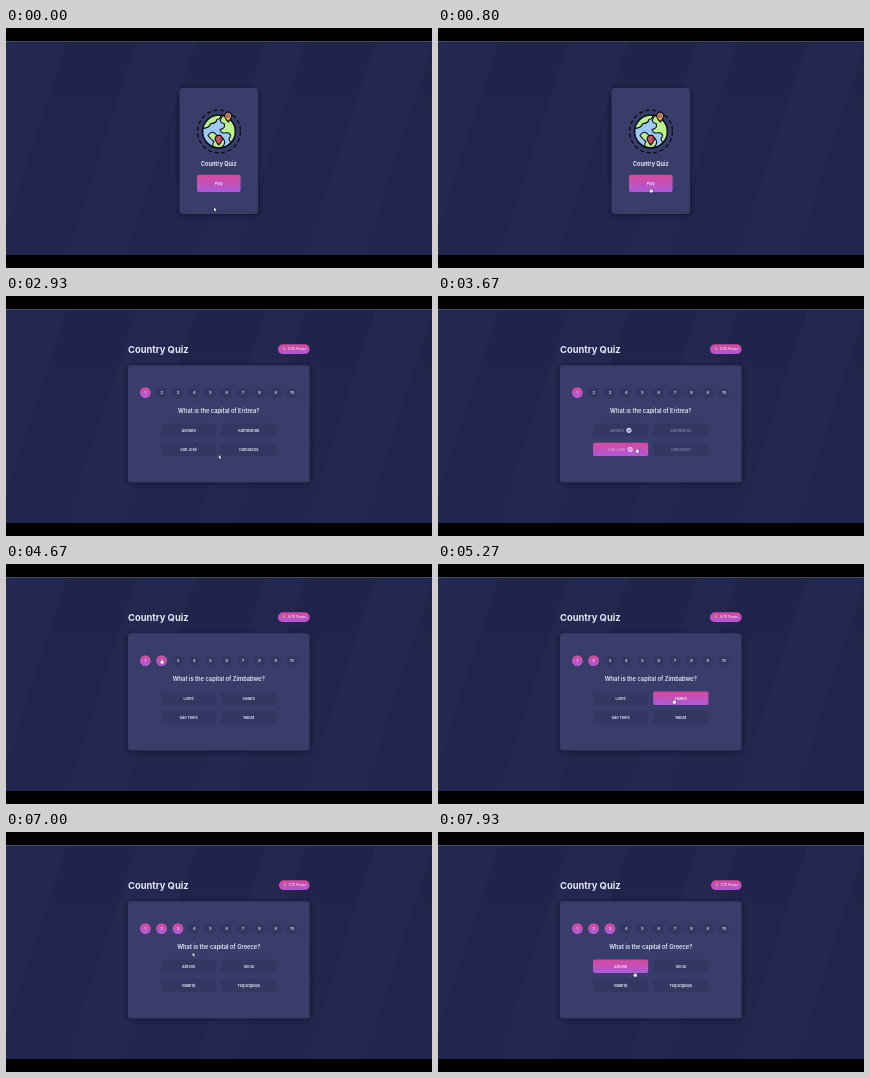
An HTML page with a canvas for the animation above (8000 ms loop, 426 px wide and 240 px high).

```html
<!DOCTYPE html>
<html lang="en">
<head>
<meta charset="utf-8">
<title>Country Quiz</title>
<style>
  html, body { margin: 0; width: 100%; height: 100%; overflow: hidden; background: #000; }
  canvas { display: block; width: 426px; height: 240px; }
</style>
</head>
<body>
<canvas id="stage"></canvas>
<script>
const W = 426, H = 240, LOOP = 8000;
const canvas = document.getElementById('stage');
const ctx = canvas.getContext('2d');
const scale = window.devicePixelRatio || 1;
canvas.width = W * scale;
canvas.height = H * scale;

const CARD = '#393d6a', TILE = '#343761', LIGHT = '#e5e7f5', DIM = '#7b7ea3', INK = '#080a14';

const START = 1930;
const questions = [
  { from: START, answered: 3470, country: 'Eritrea', options: ['Asmara', 'Kathmandu', 'San José', 'Damascus'], right: 0, picked: 2 },
  { from: 4330, answered: 5400, country: 'Zimbabwe', options: ['Lomé', 'Harare', 'São Tomé', 'Rabat'], right: 1, picked: 1 },
  { from: 6150, answered: Infinity, country: 'Greece', options: ['Athens', 'Seoul', 'Madrid', 'Tegucigalpa'], right: 0, picked: 0 }
];

// Pointer stops: time, x, y
const path = [
  [0, 208, 179.5], [70, 208, 179.5], [870, 213, 160], [1800, 213, 160],
  [2600, 212.8, 159], [2930, 212.8, 159], [3330, 199, 152.5], [3700, 199, 152.5],
  [4200, 155.8, 95.5], [4720, 155.8, 95.5], [5250, 236, 135.5], [5480, 236, 135.5],
  [5930, 174.3, 97.3], [6500, 174.3, 97.3], [7450, 197, 140.5], [8000, 197, 140.5]
];

const tiles = [0, 1, 2, 3].map(i => ({ x: 155 + (i % 2) * 60.2, y: i < 2 ? 127.6 : 146.7, w: 55.2, h: 13.4 }));
const playButton = { x: 191, y: 146.8, w: 43.6, h: 17.2 };
const inside = (p, b) => p.x >= b.x && p.x <= b.x + b.w && p.y >= b.y && p.y <= b.y + b.h;
const numberX = i => 139.3 + i * 16.3;

function pointerAt(t) {
  let i = 0;
  while (i < path.length - 2 && t >= path[i + 1][0]) i++;
  const [t0, x0, y0] = path[i], [t1, x1, y1] = path[i + 1];
  const k = Math.min(1, (t - t0) / (t1 - t0));
  const e = k * k * (3 - 2 * k);
  return { x: x0 + (x1 - x0) * e, y: y0 + (y1 - y0) * e };
}

function box(b, r, fill) {
  ctx.beginPath();
  ctx.roundRect(b.x, b.y, b.w, b.h, r);
  ctx.fillStyle = fill;
  ctx.fill();
}

function circle(x, y, r, fill, line) {
  ctx.beginPath();
  ctx.arc(x, y, r, 0, Math.PI * 2);
  if (fill) { ctx.fillStyle = fill; ctx.fill(); }
  if (line) { ctx.lineWidth = line; ctx.strokeStyle = INK; ctx.stroke(); }
}

function pink(y, h) {
  const g = ctx.createLinearGradient(0, y, 0, y + h);
  g.addColorStop(0, '#d9489a');
  g.addColorStop(1, '#ab5bdb');
  return g;
}

function setFont(size, weight) {
  ctx.font = `${weight} ${size}px Inter, "Open Sans", sans-serif`;
}

function text(str, x, y, size, weight = 600, fill = LIGHT, align = 'center') {
  setFont(size, weight);
  ctx.textAlign = align;
  ctx.textBaseline = 'alphabetic';
  ctx.fillStyle = fill;
  ctx.fillText(str, x, y + size * 0.365);
}

function panel(x, y, w, h) {
  ctx.save();
  ctx.shadowColor = 'rgba(8, 9, 28, .65)';
  ctx.shadowBlur = 6 * scale;
  ctx.shadowOffsetY = scale;
  box({ x, y, w, h }, 3.5, CARD);
  ctx.restore();
}

function backdrop() {
  ctx.fillStyle = '#000';
  ctx.fillRect(0, 0, W, H);
  ctx.save();
  ctx.beginPath();
  ctx.rect(0, 13, W, 214);
  ctx.clip();
  ctx.fillStyle = '#242750';
  ctx.fillRect(0, 13, W, 214);
  for (const x of [61, 190, 300, 428]) {
    const g = ctx.createLinearGradient(0, 13, 0, 227);
    g.addColorStop(0, '#20234a');
    g.addColorStop(1, '#22254d');
    ctx.fillStyle = g;
    ctx.beginPath();
    ctx.moveTo(x, 13);
    ctx.lineTo(x + 70, 13);
    ctx.lineTo(x, 227);
    ctx.lineTo(x - 70, 227);
    ctx.fill();
  }
  ctx.fillStyle = '#55586b';
  ctx.fillRect(0, 13, W, 0.7);
  ctx.restore();
}

function land(d) {
  const shape = new Path2D(d);
  ctx.fillStyle = '#b9ef8d';
  ctx.fill(shape);
  ctx.lineWidth = 1.1;
  ctx.strokeStyle = INK;
  ctx.stroke(shape);
}

function pin(x, y, fill) {
  ctx.beginPath();
  ctx.arc(x, y, 3.5, Math.PI * 0.85, Math.PI * 2.15);
  ctx.quadraticCurveTo(x + 2.3, y + 4, x, y + 6.2);
  ctx.quadraticCurveTo(x - 2.3, y + 4, x - 3.1, y + 1.6);
  ctx.closePath();
  ctx.fillStyle = fill;
  ctx.fill();
  ctx.lineWidth = 1.1;
  ctx.strokeStyle = INK;
  ctx.stroke();
  circle(x, y, 1.2, '#f4e8ee', 0.7);
}

function globe() {
  ctx.save();
  ctx.translate(213, 103.5);
  ctx.setLineDash([4.2, 2.55]);
  circle(0, 0, 21.4, null, 1.3);
  ctx.setLineDash([]);
  circle(0, 0, 16.4, '#9cc9f7');
  ctx.save();
  ctx.clip();
  land('M-17 -9 Q-8 -20 1 -17 Q3 -13 -2 -12 Q-3 -8 -8 -8 Q-10 -3 -17 -3Z');
  land('M5 -18 L18 -8 L18 12 Q11 13 10 7 Q14 3 8 1 Q2 3 1 -2 Q7 -3 5 -8 Q0 -9 2 -13Z');
  land('M-11 4 Q-7 -2 -3 3 Q-1 6 3 6 Q7 9 5 13 Q2 18 -4 18 Q-8 14 -5 10 Q-8 8 -11 4Z');
  ctx.restore();
  circle(0, 0, 16.4, null, 1.5);
  pin(9.2, -15.7, '#f39a58');
  pin(-0.2, 7.3, '#ec5361');
  ctx.restore();
}

function startScreen() {
  panel(173.5, 60, 78.5, 126);
  globe();
  text('Country Quiz', 212.8, 136, 5.5, 700);
  box(playButton, 2, pink(playButton.y, playButton.h));
  text('Play', 212.8, 155.4, 3.9);
}

function mark(x, y, ok) {
  circle(x, y, 2.6, ok ? '#c3d2ec' : '#e6b5ea');
  ctx.beginPath();
  if (ok) {
    ctx.moveTo(x - 1.2, y);
    ctx.lineTo(x - 0.3, y + 1);
    ctx.lineTo(x + 1.3, y - 1);
  } else {
    ctx.moveTo(x - 0.9, y - 0.9);
    ctx.lineTo(x + 0.9, y + 0.9);
    ctx.moveTo(x + 0.9, y - 0.9);
    ctx.lineTo(x - 0.9, y + 0.9);
  }
  ctx.lineWidth = 0.7;
  ctx.strokeStyle = ok ? '#343961' : '#a04fae';
  ctx.stroke();
}

function option(q, i, done, p) {
  const b = tiles[i], hover = inside(p, b);
  const cx = b.x + b.w / 2, cy = b.y + b.h / 2;
  box(b, 2, hover ? pink(b.y, b.h) : TILE);
  const fill = !done ? LIGHT : hover ? '#d894dc' : DIM;
  const marked = done && (i === q.right || i === q.picked);
  setFont(3.8, 600);
  const w = ctx.measureText(q.options[i]).width;
  text(q.options[i], cx - (marked ? 3.9 : 0), cy, 3.8, 600, fill);
  if (marked) mark(cx + w / 2 + 1.3, cy, i === q.right);
}

function trophy(x, y) {
  ctx.fillStyle = '#f3b45c';
  ctx.beginPath();
  ctx.arc(x, y - 1, 1.1, 0, Math.PI);
  ctx.fill();
  ctx.fillRect(x - 0.25, y - 0.2, 0.5, 1.2);
  ctx.fillRect(x - 0.8, y + 0.8, 1.6, 0.5);
}

function quizScreen(t, p) {
  const n = questions.filter(q => t >= q.from).length;
  const q = questions[n - 1];
  const points = questions.filter(a => t >= a.answered && a.picked === a.right).length;

  text('Country Quiz', 122, 53.2, 9.4, 700, LIGHT, 'left');
  const left = points ? 273 : 272;
  box({ x: left, y: 48.2, w: 303.6 - left, h: 9.9 }, 4.95, pink(48.2, 9.9));
  trophy(left + 6, 52.6);
  text(`${points}/10 Points`, 300, 53.2, 3.4, 500, '#f6dff2', 'right');

  panel(122, 69.2, 181.6, 117.2);
  for (let i = 0; i < 10; i++) {
    circle(numberX(i), 96.6, 5.4, i < n ? pink(91.2, 10.8) : TILE);
    text(i + 1, numberX(i), 96.6, 3.8);
  }
  text(`What is the capital of ${q.country}?`, 212.8, 114.6, 5.75, 600);
  tiles.forEach((b, i) => option(q, i, t >= q.answered, p));
}

const arrow = new Path2D('M0 0 L0 3.6 L.9 2.9 L1.5 4.1 L2.1 3.8 L1.5 2.6 L2.6 2.5Z');
const hand = new Path2D('M-.5 0 Q0 -.5 .5 0 L.5 1.3 L2 1.8 L1.8 3.6 L1.3 4.2 L-.7 4.2 L-1.8 2.4 L-1.4 2 L-.5 2.6Z');

function pointer(p, link) {
  ctx.save();
  ctx.translate(p.x, p.y);
  const shape = link ? hand : arrow;
  ctx.lineWidth = 0.6;
  ctx.strokeStyle = '#15172c';
  ctx.stroke(shape);
  ctx.fillStyle = '#fff';
  ctx.fill(shape);
  ctx.restore();
}

function overLink(t, p) {
  if (t < START) return inside(p, playButton);
  if (tiles.some(b => inside(p, b))) return true;
  return Array.from({ length: 10 }, (_, i) => Math.hypot(p.x - numberX(i), p.y - 96.6)).some(d => d < 5.4);
}

function draw(now) {
  const t = now % LOOP, p = pointerAt(t);
  ctx.setTransform(scale, 0, 0, scale, 0, 0);
  backdrop();
  if (t < START) startScreen();
  else quizScreen(t, p);
  pointer(p, overLink(t, p));
}

const begin = performance.now();
function tick() {
  draw(performance.now() - begin);
  requestAnimationFrame(tick);
}
tick();
</script>
</body>
</html>
```
